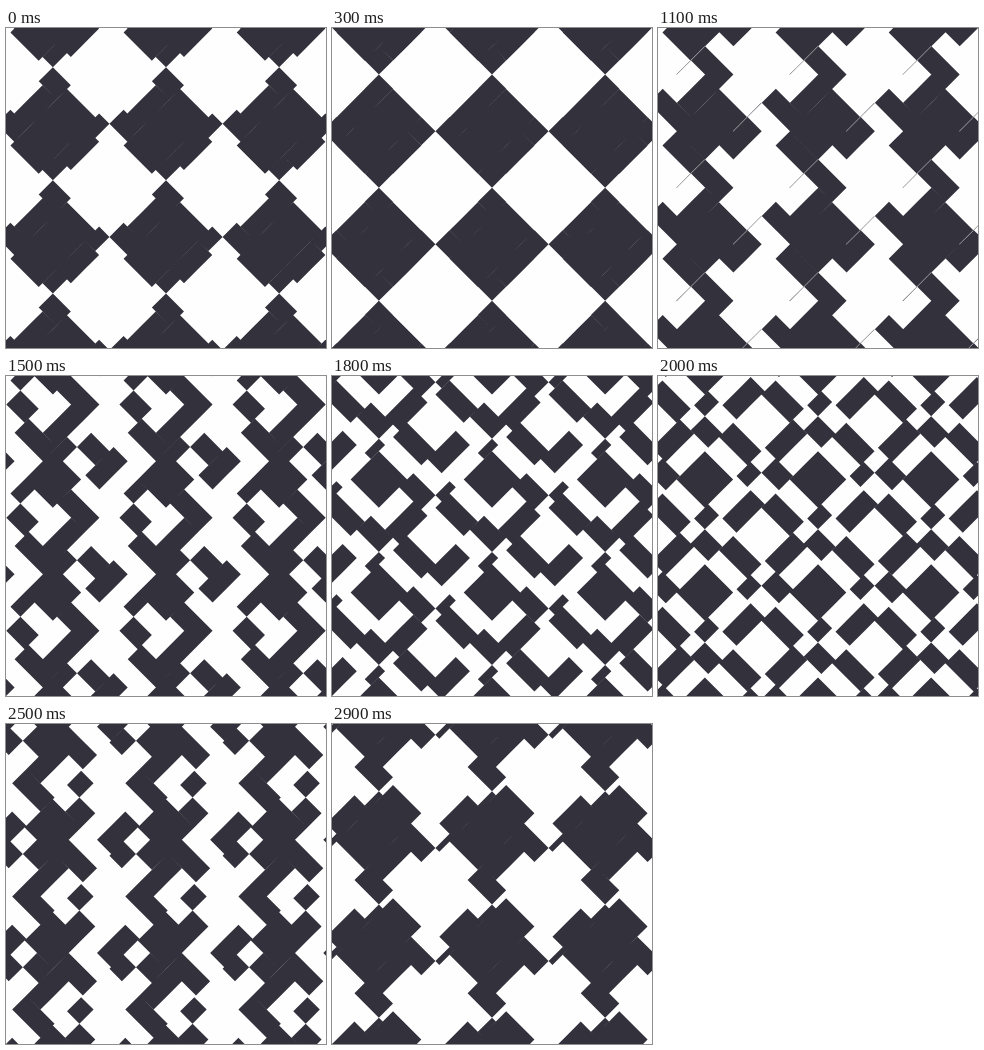
Animation of 320x320 px, one loop 3 s. Source, as an HTML page with a canvas:

```html
<!DOCTYPE html>
<html>
<head>
<meta charset="utf-8">
<style>
  html, body { margin: 0; width: 100%; height: 100%; overflow: hidden; background: #fff; }
  canvas { display: block; }
</style>
</head>
<body>
<canvas id="stage" width="320" height="320"></canvas>
<script>
const ctx = document.getElementById('stage').getContext('2d');
const TILE = 80, STRIP = TILE / 2, UNIT = TILE / 4;
const isEven = n => n % 2 === 0;

// Checkerboard whose even row strips slide along x, then even column strips along y.
function draw(slide) {
  ctx.setTransform(1, 0, 0, 1, 0, 0);
  ctx.fillStyle = '#fefefe';
  ctx.fillRect(0, 0, 320, 320);
  ctx.translate(160, 160);
  ctx.rotate(Math.PI / 4);
  ctx.beginPath();
  for (let col = -6; col <= 6; col++) {
    const left = col * STRIP - UNIT, right = left + STRIP;
    const dy = isEven(col) ? slide : 0;
    for (let row = -14; row < 23; row++) {
      const dx = isEven(Math.floor((row + 1) / 2)) ? slide : 0;
      const tileRow = Math.floor(row / 4);
      for (let tile = -5; tile < 8; tile++) {
        if (!isEven(tile + tileRow)) continue;
        const x = tile * TILE + dx;
        const from = Math.max(left, x), to = Math.min(right, x + TILE);
        if (to > from) ctx.rect(from, row * UNIT + dy, to - from, UNIT);
      }
    }
  }
  ctx.fillStyle = '#33313c';
  ctx.fill();
}

function tick() {
  const t = Math.floor(performance.now() % 3000 / 100) / 10;
  draw(-TILE * (1 - Math.cos(t - 0.37)));
  requestAnimationFrame(tick);
}
tick();
</script>
</body>
</html>
```
